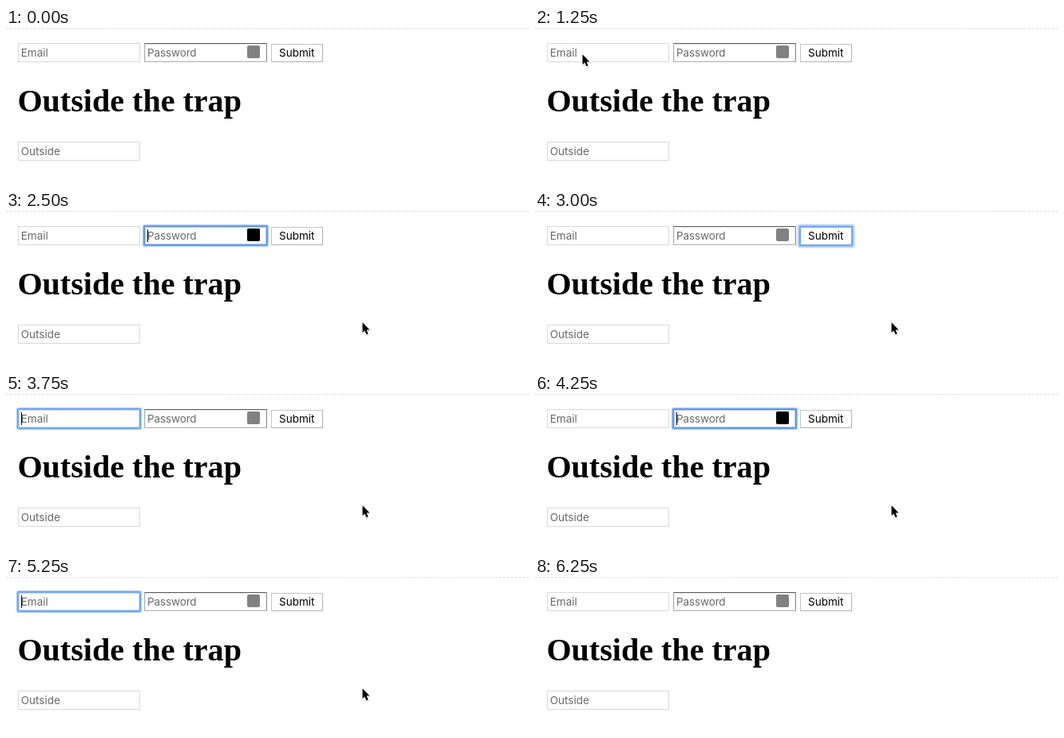
An HTML page that plays this animation: 655 by 195 pixels, repeating every 6.5 s.

```html
<!DOCTYPE html>
<html lang="en">
<head>
<meta charset="utf-8">
<title>Focus trap</title>
<style>
  html, body { margin: 0; width: 100%; height: 100%; overflow: hidden; background: #fff; }
  .stage {
    position: relative; width: 655px; height: 195px; overflow: hidden;
    font: 13.5px/24px Inter, Roboto, sans-serif;
  }
  .stage * { position: absolute; box-sizing: border-box; margin: 0; }
  .rule { left: 0; top: 0; width: 655px; border-top: 1px dashed #dcdcdc; }
  h1 {
    left: 14.4px; top: 69px; white-space: nowrap; color: #000;
    font: bold 40.1px/46px "Liberation Serif", "Noto Serif", serif;
  }

  .box { top: 19px; height: 24px; border: 1px solid #d8d8d8; }
  .box span { left: 2.7px; top: -1px; color: #686868; white-space: nowrap; }
  .email { left: 15px; width: 153px; }
  .password { left: 173px; width: 154px; border-color: #5c5c5c #8c8c8c #b8b8b8 #b0b0b0; }
  .password:not(.ring) { box-shadow: inset 0 0 0 1px #e8e8e8; }
  .password span { left: 3px; letter-spacing: -.12px; }
  .submit { left: 332px; top: 20px; width: 65px; height: 23px; border-color: #c4c4c4 #b0b0b0 #b0b0b0 #c4c4c4; }
  .submit span { left: 9px; top: -2px; color: #000; }
  .outside { left: 15px; top: 143px; width: 153px; }
  .badge { left: 302px; top: 22px; width: 16px; height: 16px; border-radius: 2px; background: #818181; }
  .badge.dark { background: #000; }

  .ring {
    border: 1px solid #76aaf3; border-radius: 1px;
    box-shadow: 0 0 0 1px #6fa5f2, 0 0 1px 2px rgba(110, 165, 245, .65), inset 0 0 1px 1px rgba(120, 172, 246, .45);
  }
  .password.ring { border-color: #5c90dc; }
  .submit.ring { box-shadow: 0 0 0 1px #6fa5f2, 0 0 2px 3px rgba(110, 165, 245, .65); }
  .caret { top: 23px; width: 1px; height: 16px; background: #000; }

  .anim { opacity: 0; animation: 6.5s step-end infinite; }
  .on-email { animation-name: email; }
  .on-caret { animation-name: caret; }
  .on-password { animation-name: password; }
  .on-submit { animation-name: submit; }
  .pointer { left: 0; top: 0; overflow: visible; animation-name: pointer; }

  @keyframes email {
    0%, 38.461%, 65.384%, 96.153%, 100% { opacity: 0; }
    23.076%, 57.692%, 80.769% { opacity: 1; }
  }
  @keyframes caret {
    0%, 30.769%, 65.384%, 88.461%, 100% { opacity: 0; }
    23.076%, 57.692%, 80.769% { opacity: 1; }
  }
  @keyframes password {
    0%, 46.153%, 73.076%, 100% { opacity: 0; }
    38.461%, 65.384% { opacity: 1; }
  }
  @keyframes submit {
    0%, 57.692%, 80.769%, 100% { opacity: 0; }
    46.153%, 73.076% { opacity: 1; }
  }
  @keyframes pointer {
    0% { opacity: 0; transform: translate(137px, 14px); }
    3.846% { opacity: 1; transform: translate(137px, 14px); }
    7.692% { opacity: 1; transform: translate(104px, 24px); }
    11.538% { opacity: 1; transform: translate(67px, 32px); }
    15.384% { opacity: 1; transform: translate(52px, 33px); }
    19.23% { opacity: 1; transform: translate(59px, 33px); }
    23.076% { opacity: 1; transform: translate(71px, 28px); }
    26.923% { opacity: 1; transform: translate(382px, 132px); }
    30.769% { opacity: 1; transform: translate(444px, 141px); }
    34.615% { opacity: 1; transform: translate(446px, 140px); }
    88.461% { opacity: 1; transform: translate(569px, 41px); }
    92.307%, 100% { opacity: 0; transform: translate(569px, 41px); }
  }
</style>
</head>
<body>
<div class="stage">
  <div class="rule"></div>

  <div class="box email"><span>Email</span></div>
  <div class="box password"><span>Password</span></div>
  <div class="badge"></div>
  <div class="box submit"><span>Submit</span></div>
  <h1>Outside the trap</h1>
  <div class="box outside"><span>Outside</span></div>

  <div class="anim on-email"><div class="box email ring"></div></div>
  <div class="anim on-caret"><div class="caret" style="left:19px"></div></div>
  <div class="anim on-password">
    <div class="box password ring"></div>
    <div class="badge dark"></div>
    <div class="caret" style="left:177px"></div>
  </div>
  <div class="anim on-submit"><div class="box submit ring"></div></div>

  <svg class="anim pointer" width="14" height="20">
    <path d="M.5 1.5V15L3.5 12.2 5.8 17.4 8.4 16.3 6.2 11.2H10.5Z" fill="#000" opacity=".16"/>
    <path d="M.5 .3V13L3.3 10.4 5.4 15.2 7.6 14.3 5.5 9.6H9.4Z" fill="#000" stroke="#fff" stroke-width="1.2" paint-order="stroke"/>
  </svg>
</div>
</body>
</html>
```
